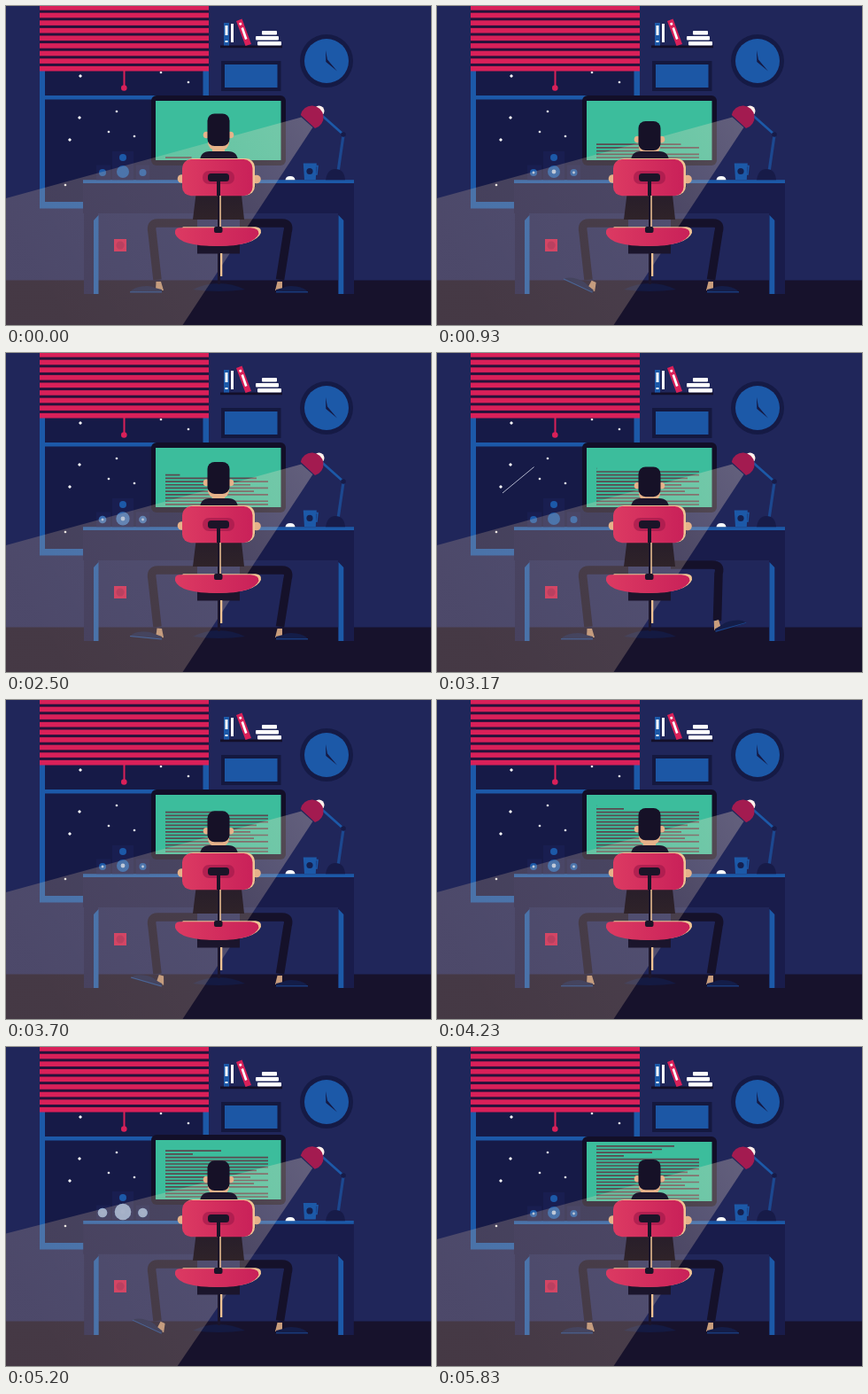
Recreate the animation shown at these times as an HTML page. Size 480 by 360 pixels, loop 5860 ms.

```html
<!DOCTYPE html>
<html lang="en">
<head>
<meta charset="utf-8">
<title>Night coder</title>
<style>
html, body { margin: 0; width: 100%; height: 100%; overflow: hidden; background: #20265a; }
svg { display: block; width: 480px; height: 360px; }
</style>
</head>
<body>
<svg viewBox="0 0 480 360">
  <defs>
    <linearGradient id="light" gradientUnits="userSpaceOnUse" x1="345" y1="126" x2="40" y2="310">
      <stop offset="0" stop-color="#ffe6cc" stop-opacity=".3"/>
      <stop offset=".35" stop-color="#ffdfc0" stop-opacity=".22"/>
      <stop offset="1" stop-color="#ffd4a8" stop-opacity=".2"/>
    </linearGradient>
    <linearGradient id="red" x1="0" x2="1">
      <stop offset="0" stop-color="#dc3a62"/><stop offset="1" stop-color="#c92159"/>
    </linearGradient>
    <linearGradient id="shirt" x1="0" x2="0" y1="0" y2="1">
      <stop offset="0" stop-color="#1b152c"/><stop offset="1" stop-color="#2f2329"/>
    </linearGradient>
  </defs>

  <path fill="#20265a" d="M0 0H480V310H0z"/>
  <path fill="#17122c" d="M0 309.500H480V360H0z"/>

  <!-- window and blinds -->
  <path fill="#1c59a8" d="M38 70H229V228.500H38z"/>
  <path fill="#161a47" d="M44 73H222.500V101H44zM44 105.500H222.500V221H44z"/>
  <g id="sky" fill="#fff"></g>
  <path id="comet" stroke="#d8dcec" stroke-width=".8" fill="none"/>
  <g id="blinds">
    <path fill="#d92059" d="M38-4H229V73.500H38z"/>
    <g id="slats" fill="#25123a"></g>
    <path stroke="#d92059" stroke-width="2" d="M133.500 73V91"/>
    <circle cx="133.300" cy="92.500" r="3.300" fill="#d92059"/>
  </g>

  <!-- shelf, picture, clock -->
  <path fill="#130f28" d="M242 44.500H312V47.300H242z"/>
  <path fill="#1c59a8" d="M246 19H252V44.500H246z"/>
  <path fill="#fff" d="M247.500 22H250.500V33H247.500zM254 20H257V41H254zM247.500 39H250.500V41H247.500z"/>
  <path fill="#d92059" d="M260 17L266.500 14.500L277 43L270.500 45z"/>
  <path fill="#fff" d="M263 19.500L265.500 18.500L266.500 21L264 22zM265.500 25L268 24L272.500 37L270 38z"/>
  <g fill="#fff">
    <rect x="289" y="28" width="17" height="4.500" rx="1"/>
    <rect x="282" y="34" width="26" height="4.500" rx="1"/>
    <rect x="284" y="40" width="27" height="4.500" rx="1"/>
  </g>
  <path fill="#14183f" d="M243 62H310.500V96H243z"/>
  <path fill="#1c57a5" d="M247 66H306.500V92H247z"/>
  <circle cx="362" cy="62" r="30" fill="#151a45"/>
  <circle cx="362" cy="62" r="25" fill="#1c59a8"/>
  <path d="M361 50L363 60.500L374 73.500L361.300 63z" fill="#151a45"/>

  <!-- monitor -->
  <g id="monitor">
    <rect x="164" y="101" width="152" height="79" rx="6" fill="#120f28"/>
    <path fill="#3cbd9c" d="M169 107H310.500V174H169z"/>
    <path id="text" stroke="#5a4a50" stroke-width="1.700" fill="none"/>
  </g>

  <!-- desk -->
  <g id="desk">
    <path fill="#191c4b" d="M87 199H393V325H375V234H104V325H88V234H87z"/>
    <path fill="#1c59a8" d="M87 196.300H393V200H87zM99 242L104.500 236V325H99zM375.500 236L381.300 242V325H375.500z"/>
  </g>
  <g id="speakers">
    <path fill="#191e50" d="M102 179.500H118V196.300H102zM120 164H144V196.300H120zM147 179.500H162V196.300H147z"/>
    <circle cx="132" cy="171" r="4" fill="#1c59a8"/>
    <g id="woofers"></g>
  </g>
  <path fill="#c81f50" d="M122 263H136V277H122z"/>
  <circle cx="129" cy="270" r="4.500" fill="#a8184a"/>

  <!-- lamp stand, mug, mouse -->
  <path d="M375 187L381 146" stroke="#1c4890" stroke-width="3.200"/>
  <path d="M381 145L354 121" stroke="#1c59a8" stroke-width="2.600"/>
  <circle cx="381" cy="145" r="2.800" fill="#171b48"/>
  <path fill="#171b48" d="M361 196.300Q363 184 372 184Q382 184 383 196.300z"/>
  <g id="mug">
    <path d="M349 180.500H352L351 190H348" fill="none" stroke="#1c59a8" stroke-width="1.600"/>
    <path fill="#1c59a8" d="M335.800 177.500H350.800L349.800 196H337z"/>
    <circle cx="343" cy="186.500" r="3.600" fill="#15204f"/>
  </g>
  <path id="mouse" fill="#fff" d="M315.500 196.300Q316 192 321 192Q326 192 326.500 196.300z"/>

  <!-- legs and chair foot -->
  <g fill="none" stroke="#15112a" stroke-width="9.500">
    <path d="M216 245H171Q163 245 165 255L171 309"/>
    <path id="shin"/>
  </g>
  <g id="footL">
    <path fill="#b58c70" d="M169.500 311H175L178 321H169z"/>
    <path fill="#141d48" d="M140 323Q143 318 153 316.500Q163 315 168 318L176 320V323.500H140z"/>
    <path stroke="#1c4890" d="M140 322.800H176"/>
  </g>
  <g id="footR">
    <path fill="#c99d7c" d="M306.500 311H312L312 321H304z"/>
    <path fill="#141d48" d="M341 323Q338 318 328 316.500Q318 315 313 318L305 320V323.500H341z"/>
    <path stroke="#1c4890" d="M305 322.800H341"/>
  </g>
  <path fill="#141a42" d="M211 320Q225 313 240 313Q256 313 270 320Q240 324 211 320z"/>

  <path id="beam" fill="url(#light)" d="M333.500 125.500L-266.500 290L-94.500 806L346.500 137z"/>

  <!-- person -->
  <g id="head" fill="#e6b28a">
    <circle cx="226.500" cy="145.500" r="3.800"/><circle cx="253.500" cy="145.500" r="3.800"/>
    <rect x="228" y="134" width="24" height="29" rx="9"/>
    <path d="M233 155H247V178H233z"/>
    <rect id="hair" x="227.500" width="25" rx="8" fill="#161127"/>
  </g>
  <path fill="url(#shirt)" d="M219 176Q219 164 230 164H251Q262 164 262 176L269 241H211z"/>
  <circle cx="198.500" cy="195" r="4.800" fill="#e6b28a"/>
  <path id="arm" fill="none" stroke="#2a2028" stroke-width="10" stroke-linejoin="round"/>
  <circle id="hand" cy="195.500" r="4.800" fill="#e6b28a"/>

  <!-- chair -->
  <path fill="#1b152c" d="M216 268H264V279.500H216zM239 279H242V314H239z"/>
  <path fill="#f0c394" d="M242 279H244.300V305H242z"/>
  <rect x="201" y="172" width="80" height="41.500" rx="10" fill="#f0c394"/>
  <rect x="199" y="173" width="79.500" height="41.200" rx="10" fill="url(#red)"/>
  <rect x="222" y="186" width="36" height="15" rx="7" fill="#a0194a" opacity=".65"/>
  <rect x="228" y="189" width="24" height="9" rx="3.500" fill="#1b1428"/>
  <path fill="#1b1428" d="M238 197H242V214H241.300V252H239V214H238z"/>
  <path fill="#f0c394" d="M241.300 214H242.800V250H241.300z"/>
  <path fill="#f0c394" d="M200 249.300H282Q289 250 288 256Q282 270.500 239 270.500Q200 270.500 193 256z"/>
  <path fill="url(#red)" d="M196 250.300H276Q286 251 285.500 257Q280 271 239 271Q196 271 191 257Q190 250.500 196 250.300z"/>
  <rect x="235" y="249" width="9.500" height="7" rx="2" fill="#1b1428"/>

  <!-- lamp head -->
  <g id="lamp">
    <circle cx="353.500" cy="118.500" r="6" fill="#fff1ec"/>
    <path fill="#a31b50" d="M332.800 123A13 13 0 1 1 349 138z"/>
  </g>
</svg>
<script>
const LOOP = 5860, BEAT = LOOP / 10, JOLT = 1870;
const $ = id => document.getElementById(id);
const clamp = x => Math.max(0, Math.min(1, x));
const set = (id, attrs) => { for (const k in attrs) $(id).setAttribute(k, attrs[k]); };
const move = (id, transform) => set(id, { transform });

// Value of a keyed curve at x, eased between keys unless linear
function key(x, keys, linear) {
  if (x <= keys[0][0]) return keys[0][1];
  for (let i = 1; i < keys.length; i++) {
    const [a, u] = keys[i - 1], [b, v] = keys[i];
    if (x < b) {
      const f = (x - a) / (b - a);
      return u + (v - u) * (linear ? f : f * f * (3 - 2 * f));
    }
  }
  return keys[keys.length - 1][1];
}

// Still details
$('sky').innerHTML = [[84, 79], [175, 75], [206, 86], [83, 126], [125, 119], [116, 142], [72, 151], [67, 202], [145, 147]]
  .map(([x, y], i) => {
    const r = i % 3 ? 1.6 : 2;
    return `<path d="M${x - r} ${y}L${x} ${y - r}L${x + r} ${y}L${x} ${y + r}z"/>`;
  }).join('');
for (let i = 0; i < 8; i++)
  $('slats').innerHTML += `<rect x="38" y="${4.7 + 8.6 * i}" width="191" height="3"/>`;

const rowEnds = [296, 296, 232, 296, 280, 296, 276, 296, 283, 296, 296, 296, 296, 211, 243, 254, 268];
const typed = [[0, .25], [930, 4.95], [1750, 8.8], [2450, 9], [3170, 11], [4230, 14], [4700, 15], [5350, 15], [5830, 17]];
const bob = [[0, 0], [.22, .5], [.41, 7], [.59, 8.5], [.87, 6.8], [.95, 5.5], [1, 0]];
const tapLeft = [[.22, 0], [.38, 1], [.87, 1], [.95, 0]];
const tapRight = [[.12, 0], [.38, 1], [.75, 1], [.95, 0]];

function draw(t) {
  const beat = Math.floor(t / BEAT), p = t / BEAT - beat;

  // The desk gets thumped once in each half of the loop
  const j = t % (LOOP / 2) - JOLT;
  const shake = key(j, [[0, 0], [130, 1], [260, -.4], [400, -.1], [600, 0]]);
  const lift = key(j, [[0, 0], [130, 3], [400, 2], [650, 0]]);
  const boom = key(j, [[-40, 0], [130, 1], [400, .65], [750, 0]]);
  const reach = key(j, [[-150, 0], [10, 1], [270, 1], [390, 0]]);
  const hop = key(j, [[0, 0], [130, 1], [330, 0]]);

  const n = key(t, typed, true);
  set('text', { d: rowEnds.map((end, k) => {
    const f = clamp(n - k);
    return f ? `M180 ${171 - 3.7 * k}H${180 + (end - 180) * f}` : '';
  }).join('') });

  const front = clamp((t - 3000) / 170), tail = clamp((t - 3100) / 225);
  const at = u => `${126 - 52 * u} ${115 + 43 * u}`;
  set('comet', { d: front > tail ? `M${at(tail)}L${at(front)}` : '' });

  const swing = `translate(${shake} ${2 * shake}) rotate(${-9.5 * shake} 347 126)`;
  move('lamp', swing);
  move('beam', swing);
  move('blinds', `translate(0 ${-shake * .6})`);
  move('monitor', `translate(0 ${-lift})`);
  move('speakers', `translate(0 ${-lift * .5})`);
  move('mug', `translate(0 ${-lift * .8})`);
  move('mouse', `translate(${-hop} ${-14 * hop}) rotate(${-14 * hop} 321 195)`);
  move('desk', `translate(240 325) scale(${1 + .013 * shake} ${1 - .0235 * shake}) translate(-240 -325)`);

  const dot = t % (LOOP / 2) < 300 ? 0 : .75;
  $('woofers').innerHTML = [[109, 188, 4], [132, 187, 7], [154.5, 188, 4]].map(([x, y, r]) =>
    `<circle cx="${x}" cy="${y}" r="${r + boom * r * .5}" fill="#1c59a8"/>` +
    `<circle cx="${x}" cy="${y}" r="${r * .35}" fill="#dfe8f4" opacity="${dot}"/>` +
    `<circle cx="${x}" cy="${y}" r="${r + boom * r * .5}" fill="#8fa6cc" opacity="${clamp(boom * 1.5)}"/>`).join('');

  // Nodding tips the crown further than the chin
  const nod = key(p, bob);
  move('head', `translate(0 ${nod * .6})`);
  set('hair', { y: 121.5 + nod * .4, height: 36.5 - nod * .4 });

  const left = beat === 5 ? 0 : key(p, tapLeft);
  const right = beat === 5 ? key(p, tapRight) : 0;
  move('footL', `rotate(${25 * left} 175 322)`);
  move('footR', `translate(${9 * right} ${-9 * right}) rotate(${-16 * right} 307 321)`);
  const knee = 245 - 6 * right;
  set('shin', { d: `M264 ${knee}H${312 - right}Q321 ${knee} 318 ${knee + 10}L${309.5 + 7 * right} ${309 - 7 * right}` });

  const x = 283 + 27 * reach;
  set('hand', { cx: x });
  set('arm', { d: `M260 182L${266 + 8 * reach} ${206 + 18 * reach}L${272 + 14 * reach} ${207 + 8 * reach}L${x - 5} 200` });
}

const start = performance.now();
function tick() {
  draw((performance.now() - start) % LOOP);
  requestAnimationFrame(tick);
}
tick();
</script>
</body>
</html>
```
